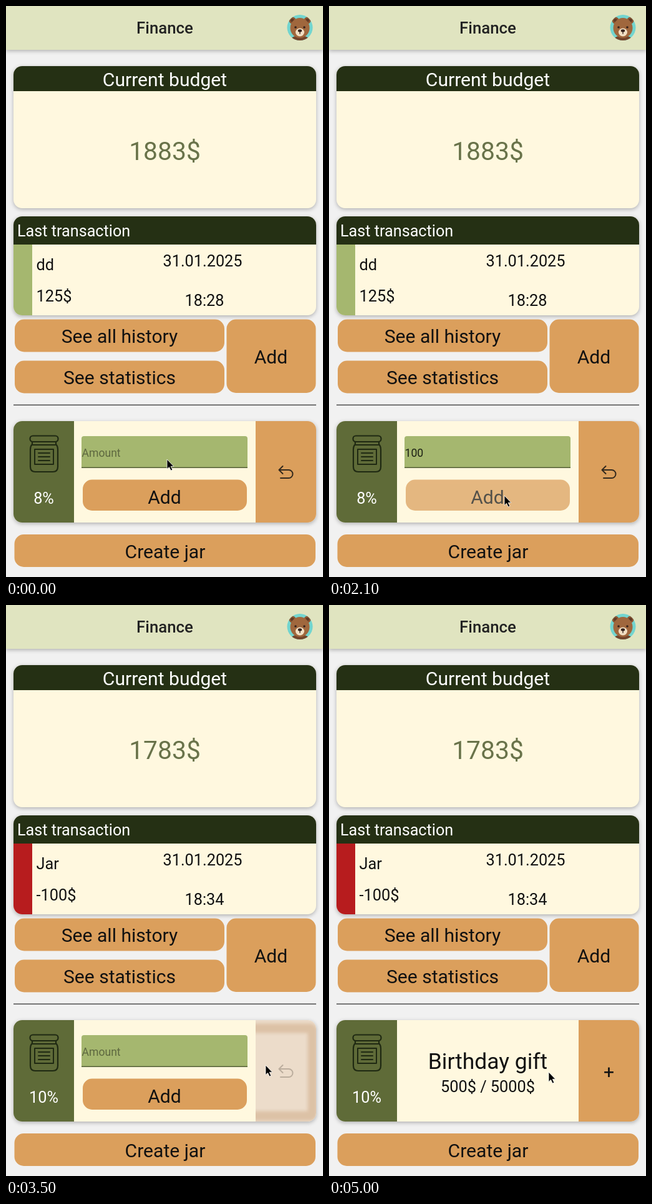
These frames come from a looping animation (508x912 px, 5100 ms). An HTML page:

```html
<!DOCTYPE html>
<html lang="en">
<head>
<meta charset="utf-8">
<title>Finance</title>
<style>
html, body { margin: 0; width: 100%; height: 100%; overflow: hidden; background: #f1f1f1; }
svg { display: block; width: 508px; height: 912px; font: 25.3px Roboto, sans-serif; fill: #111; }
.mid { text-anchor: middle; }
.big { font-size: 30.1px; }
.light { fill: #fff; }
.cream { fill: #fff8df; }
.dark { fill: #253014; }
.orange { fill: #db9f5c; }
.green { fill: #a5b76f; }
.card { filter: drop-shadow(0 2px 3px rgba(0, 0, 0, .27)); }
.line { fill: none; stroke: #1f2912; stroke-width: 2.2; stroke-linecap: round; stroke-linejoin: round; }
</style>
</head>
<body>
<svg viewBox="0 0 508 912">
  <defs>
    <clipPath id="budgetClip"><rect x="12" y="96" width="485" height="227" rx="14"/></clipPath>
    <clipPath id="lastClip"><rect x="12" y="336" width="485" height="158" rx="14"/></clipPath>
    <clipPath id="jarClip"><rect x="12" y="663" width="485" height="162" rx="14"/></clipPath>
    <clipPath id="sideClip"><rect x="400" y="663" width="97" height="162"/></clipPath>
    <clipPath id="avatarClip"><circle cx="471" cy="34.5" r="20.5"/></clipPath>
    <filter id="soft"><feGaussianBlur stdDeviation="2.5"/></filter>
  </defs>

  <rect width="508" height="912" fill="#f1f1f1"/>
  <rect class="card" width="508" height="70" style="fill:#e0e4c0"/>
  <text class="mid" x="254.5" y="44" font-size="25.8" font-weight="500" fill="#222">Finance</text>

  <g clip-path="url(#avatarClip)">
    <rect x="450" y="14" width="42" height="42" fill="#72d5cf"/>
    <ellipse cx="471" cy="57" rx="17" ry="10" fill="#74452b"/>
    <g fill="#8d5733"><circle cx="459" cy="23" r="5.5"/><circle cx="483" cy="23" r="5.5"/></g>
    <g fill="#623a25"><circle cx="459" cy="23" r="2.8"/><circle cx="483" cy="23" r="2.8"/></g>
    <ellipse cx="471" cy="35" rx="15.5" ry="16" fill="#a0673d"/>
    <ellipse cx="471" cy="42" rx="7" ry="6.5" fill="#f1dfc4"/>
    <g fill="#35211a"><circle cx="464" cy="34" r="1.8"/><circle cx="478" cy="34" r="1.8"/>
      <ellipse cx="471" cy="39.5" rx="3.2" ry="2.2"/><rect x="470.4" y="40" width="1.2" height="5"/></g>
  </g>

  <g class="card"><g clip-path="url(#budgetClip)">
    <rect class="cream" x="12" y="96" width="485" height="227"/>
    <rect class="dark" x="12" y="96" width="485" height="40"/>
  </g></g>
  <text class="mid big light" x="254.5" y="127.5">Current budget</text>
  <text class="mid" id="budget" x="254.5" y="246" font-size="40.8" fill="#69734a"></text>

  <g class="card"><g clip-path="url(#lastClip)">
    <rect class="cream" x="12" y="336" width="485" height="158"/>
    <rect class="dark" x="12" y="336" width="485" height="45"/>
    <rect id="strip" x="12" y="381" width="30" height="113"/>
  </g></g>
  <text class="light" x="18" y="368" font-size="25.2">Last transaction</text>
  <text id="label" x="48.5" y="422"></text>
  <text id="sum" x="48.5" y="471.5"></text>
  <text class="mid" x="315" y="416">31.01.2025</text>
  <text class="mid" id="clock" x="318" y="478.5"></text>

  <g class="orange">
    <rect x="14" y="500.5" width="336" height="52" rx="15"/>
    <rect x="14" y="566.5" width="336" height="52" rx="15"/>
    <rect x="353.5" y="500.5" width="143" height="117.5" rx="15"/>
    <rect x="13.5" y="844" width="482.500" height="52" rx="15"/>
  </g>
  <g class="mid big">
    <text x="182" y="538">See all history</text>
    <text x="182" y="603.500">See statistics</text>
    <text x="424.500" y="571">Add</text>
    <text x="255" y="882">Create jar</text>
  </g>
  <rect x="12" y="636.5" width="485" height="1.600" fill="#555"/>

  <g class="card"><g clip-path="url(#jarClip)">
    <rect class="cream" x="12" y="663" width="485" height="162"/>
    <rect x="12" y="663" width="97" height="162" fill="#5f6b38"/>
    <rect x="400" y="663" width="97" height="162" fill="#f1f1f1"/>
    <g clip-path="url(#sideClip)">
      <rect class="orange side" x="400" y="663" width="97" height="162"/>
      <rect id="ring" x="380" y="676" width="111" height="140" rx="4" fill="none" stroke="#a05a14" stroke-width="15" filter="url(#soft)"/>
    </g>
  </g></g>
  <g class="line">
    <rect x="38.500" y="686.500" width="45" height="9.500" rx="4.500"/>
    <path d="M42 696v4q-3 3-3 8v28q0 8 8 8h28q8 0 8-8v-28q0-5-3-8v-4M43 701h36"/>
    <path d="M46 708h30v24h-30zM52 714h18M52 720h18M52 726h18" stroke-width="2"/>
  </g>
  <text class="mid light" id="percent" x="60.500" y="795"></text>

  <g id="form">
    <path class="green" d="M121 738v-47q0-4 4-4h258q4 0 4 4v47z"/>
    <rect x="121" y="736.500" width="266" height="1.500" fill="#566039"/>
    <text id="amount" x="121.500" y="719.500" font-size="17.600"></text>
    <rect id="caret" x="141" y="701" width="3" height="23" fill="#72c9b5"/>
    <g id="addButton">
      <rect class="orange" x="123" y="756.500" width="263" height="49.500" rx="15"/>
      <text class="mid big" x="254" y="794.500">Add</text>
    </g>
    <path class="line side" d="M443.500 735l-6 6 6 6M438 741h15a6.500 6.500 0 0 1 0 13h-13" style="stroke:#33291d;stroke-width:2"/>
  </g>
  <g id="goal" class="mid">
    <text x="254.500" y="741" font-size="35.400">Birthday gift</text>
    <text x="254.500" y="778">500$ / 5000$</text>
    <text class="big side" x="448.500" y="756">+</text>
  </g>
  <path id="pointer" d="M0 0V15.500L3.500 12.300 6.200 18 8.800 16.800 6.200 11.300H10.800Z" fill="#000" stroke="#fff" stroke-width=".8"/>
</svg>
<script>
const LOOP = 5100, STEP = 100;
const $ = id => document.getElementById(id);
const sides = document.querySelectorAll('.side');
const path = [
  [0, 258, 724], [1350, 258, 724], [1600, 283, 750], [1850, 281, 782], [2400, 281, 782],
  [2700, 274, 700], [3000, 274, 700], [3300, 416, 735], [4250, 416, 735], [4700, 352, 746], [LOOP, 352, 746]
];
const typing = [[400, '1'], [600, '10'], [900, '100']];

const clamp = x => Math.min(1, Math.max(0, x));
const ease = u => u < .5 ? 2 * u * u : 1 - 2 * (1 - u) ** 2;
const show = (el, on) => { el.style.display = on ? '' : 'none'; };

function pointerAt(t) {
  const i = path.findIndex(p => p[0] > t);
  const [t0, x0, y0] = path[i - 1], [t1, x1, y1] = path[i];
  const k = ease((t - t0) / (t1 - t0));
  return [x0 + (x1 - x0) * k, y0 + (y1 - y0) * k];
}

// Opacity of a touch: dims quickly before the release, then recovers.
function touch(t, release) {
  return t < release
    ? 1 - .8 * ease(clamp((t - release + 150) / 120))
    : .2 + .8 * ease(clamp((t - release) / 250));
}

function draw(t) {
  const paid = t >= 2200;
  const editing = !paid || (t >= 3450 && t < 3830);
  const typed = paid ? '' : typing.reduce((s, [at, v]) => t >= at ? v : s, '');

  $('budget').textContent = paid ? '1783$' : '1883$';
  $('label').textContent = paid ? 'Jar' : 'dd';
  $('sum').textContent = paid ? '-100$' : '125$';
  $('clock').textContent = paid ? '18:34' : '18:28';
  $('percent').textContent = paid ? '10%' : '8%';
  $('strip').style.fill = paid ? '#b71c1e' : '#a5b76f';

  show($('form'), editing);
  show($('goal'), !editing);
  $('amount').textContent = typed || 'Amount';
  $('amount').style.fill = typed ? '#1c2014' : '#5d673f';
  show($('caret'), t >= 200 && t < 1400);
  $('caret').setAttribute('x', 121.5 + typed.length * 9.9);
  $('addButton').style.opacity = paid ? 1 : touch(t, 2200);

  const alpha = Math.min(touch(t, 3450), touch(t, 3830));
  sides.forEach(el => { el.style.opacity = alpha; });
  $('ring').style.opacity = alpha * (1 - alpha);
  $('pointer').setAttribute('transform', `translate(${pointerAt(t)})`);
}

function tick() {
  draw(Math.floor(performance.now() % LOOP / STEP) * STEP);
  requestAnimationFrame(tick);
}
tick();
</script>
</body>
</html>
```
